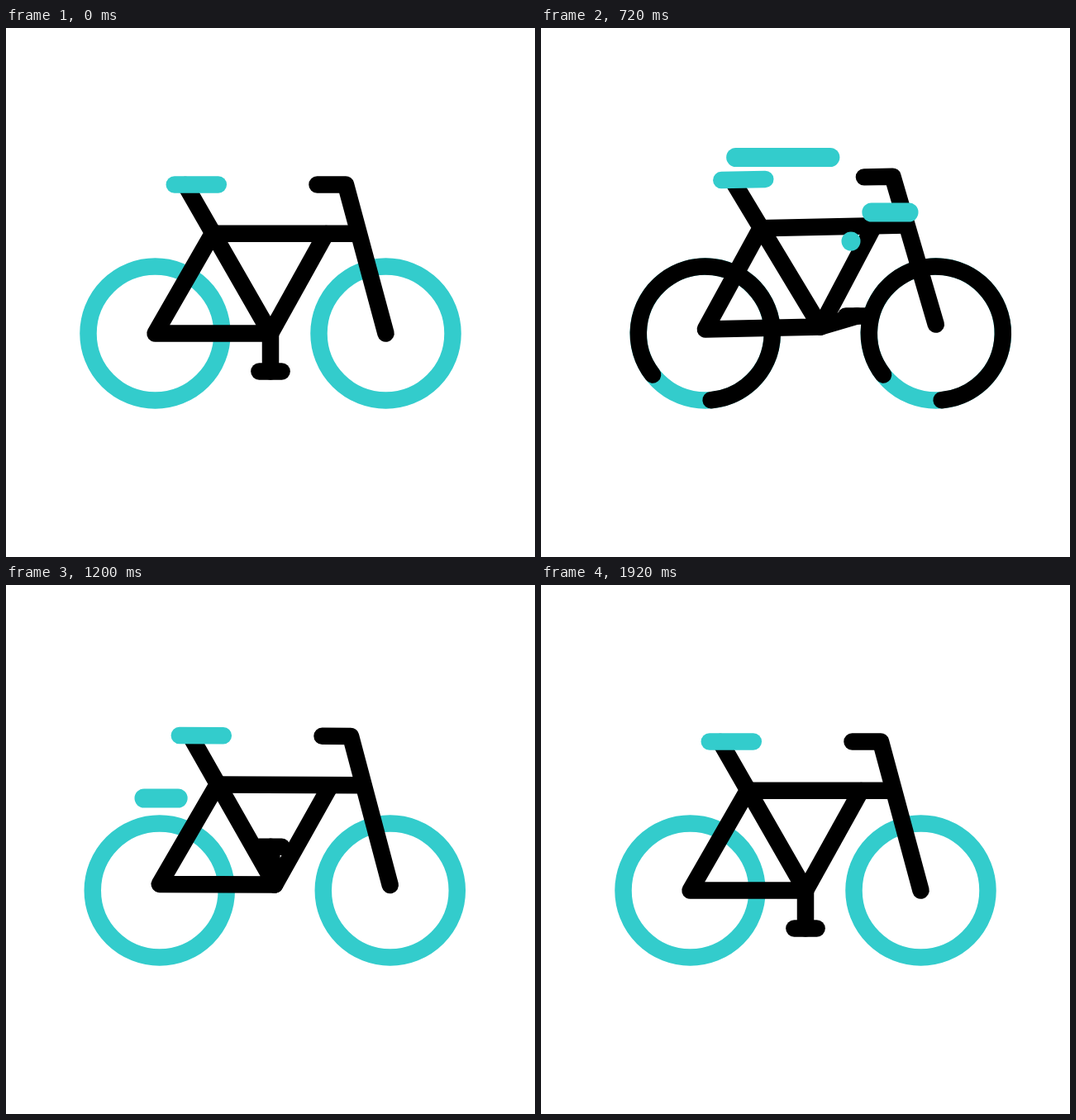
Recreate the animation shown at these times as an HTML page with a canvas. Size 640 by 640 pixels, loop 2040 ms.

```html
<!DOCTYPE html>
<html lang="en">
<head>
<meta charset="utf-8">
<title>Bicycle</title>
<style>
  html, body { margin: 0; width: 100%; height: 100%; overflow: hidden; background: #fff; }
  canvas { display: block; width: 640px; height: 640px; }
</style>
</head>
<body>
<canvas id="stage" width="640" height="640"></canvas>
<script>
const ctx = document.getElementById('stage').getContext('2d');
const TEAL = '#33cccc', BLACK = '#000';
const LOOP = 2040, STEP = 40, LAST = 1920;
const HUB_Y = 369.5, REAR_X = 180.5, FRONT_X = 459.5, CRANK_X = 320;
const RADIUS = 81, STROKE = 20.5;
const DEG = Math.PI / 180;

// Each key is [time, value]; values ease in and out between keys.
const shiftX = [[0, 0], [480, -26], [920, 52], [1360, -14.8], [1800, 0]];
const bob = [[0, 0], [480, 5.4], [710, -8], [1000, 4.2], [1200, -7], [1420, 2], [1620, -5.3], [1920, 0]];
const tilt = [[0, 0], [480, -1.12], [700, -1.24], [1040, 0], [1360, 0.48], [1600, 0]];
const pedal = [[0, 90], [1800, 810]];

const streaks = [
  { y: 156.5, from: 352, to: 186, at: 481 },
  { y: 223, from: 445, to: 244, at: 605 },
  { y: 258, from: 375, to: 167, at: 718 }
];
const STREAK_TIME = 375, STREAK_LAG = 214;

function progress(t, start, length) {
  const p = Math.min(1, Math.max(0, (t - start) / length));
  return p * p * (3 - 2 * p);
}

function valueAt(keys, t) {
  for (let i = 1; i < keys.length; i++) {
    const [t0, a] = keys[i - 1], [t1, b] = keys[i];
    if (t < t1) return a + (b - a) * progress(t, t0, t1 - t0);
  }
  return keys[keys.length - 1][1];
}

function line(color, width, ...points) {
  ctx.strokeStyle = color;
  ctx.lineWidth = width;
  ctx.beginPath();
  points.forEach(([x, y]) => ctx.lineTo(x, y));
  ctx.stroke();
}

function ring(x, color, a0, a1) {
  ctx.strokeStyle = color;
  ctx.lineWidth = STROKE;
  ctx.beginPath();
  ctx.arc(x, HUB_Y, RADIUS, a0 * DEG, a1 * DEG);
  ctx.stroke();
}

function drawWheel(x, t) {
  ring(x, TEAL, 0, 360);
  const head = progress(t, 420, 322);
  const tail = progress(t, 643, 322);
  if (head > tail) ring(x, BLACK, 90 + 360 * tail, 90 + 360 * head);
}

function drawFrame(x, y, angle) {
  ctx.save();
  ctx.translate(CRANK_X + x, HUB_Y + y);
  ctx.rotate(angle * DEG);
  ctx.translate(-CRANK_X, -HUB_Y);
  const rear = [REAR_X, HUB_Y], crank = [CRANK_X, HUB_Y], joint = [250, 248.7];
  line(BLACK, STROKE, joint, rear, crank, [217, 190]);
  line(BLACK, STROKE, joint, [425, 248.7]);
  line(BLACK, STROKE, crank, [387, 249]);
  line(BLACK, STROKE, [FRONT_X, HUB_Y], [411, 189.5], [376.5, 189.5]);
  line(TEAL, STROKE, [203.8, 189.5], [256.8, 189.5]);
  ctx.restore();
}

function drawPedal(x, y, angle) {
  const cx = CRANK_X + x, cy = HUB_Y + y;
  const px = cx + 46 * Math.cos(angle * DEG);
  const py = cy + 46 * Math.sin(angle * DEG);
  line(BLACK, STROKE, [cx, cy], [px, py]);
  line(BLACK, STROKE, [px - 13.6, py], [px + 13.6, py]);
}

function drawStreak({ y, from, to, at }, t) {
  if (t < at - 20 || t > at + STREAK_LAG + STREAK_TIME) return;
  const head = from + (to - from) * progress(t, at, STREAK_TIME);
  const tail = from + (to - from) * progress(t, at + STREAK_LAG, STREAK_TIME);
  line(TEAL, 23, [head, y], [tail + 0.01, y]);
}

function draw(t) {
  const x = valueAt(shiftX, t), y = valueAt(bob, t);
  ctx.fillStyle = '#fff';
  ctx.fillRect(0, 0, 640, 640);
  ctx.lineCap = ctx.lineJoin = 'round';
  drawWheel(REAR_X + x, t);
  drawWheel(FRONT_X + x, t);
  drawPedal(x, y, valueAt(pedal, t));
  drawFrame(x, y, valueAt(tilt, t));
  streaks.forEach(s => drawStreak(s, t));
}

let begin = null;
function tick(now) {
  if (begin === null) begin = now;
  const t = (now - begin) % LOOP;
  draw(Math.min(LAST, Math.floor(t / STEP) * STEP));
  requestAnimationFrame(tick);
}
draw(0);
requestAnimationFrame(tick);
</script>
</body>
</html>
```
